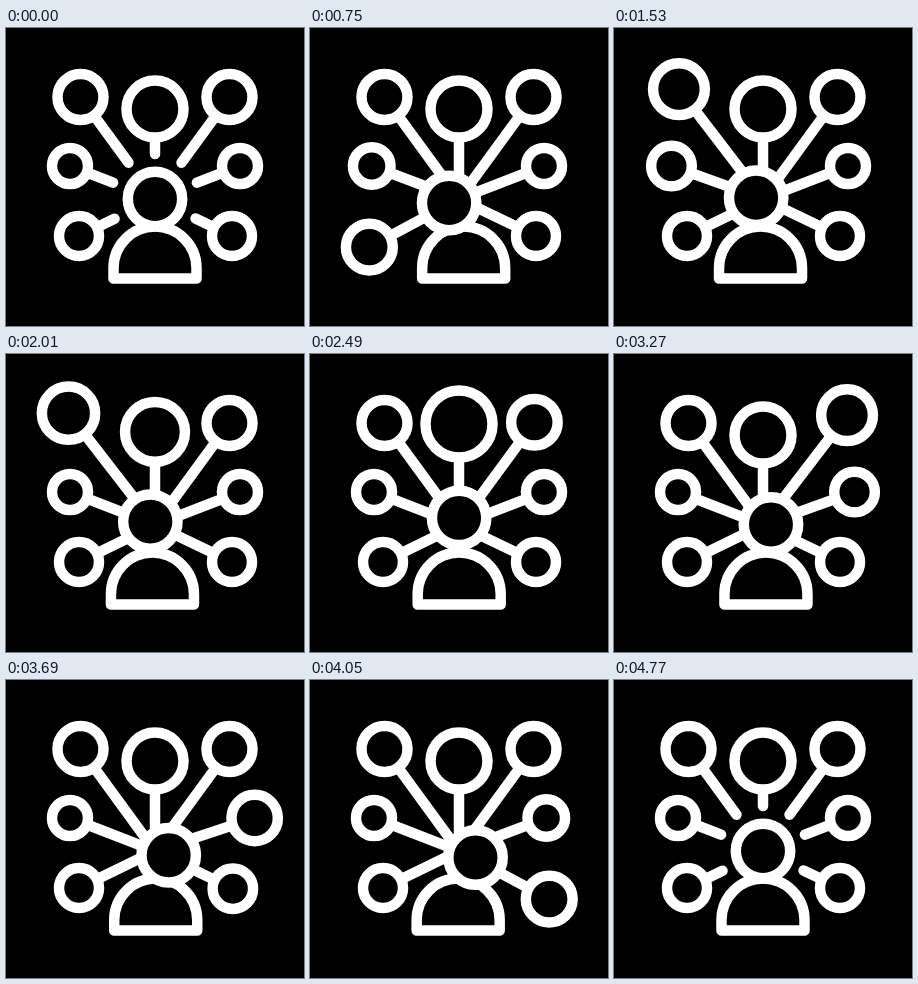
An HTML page that plays this animation: 298 by 298 pixels, repeating every 5.4 s.

```html
<!DOCTYPE html>
<html lang="en">
<head>
<meta charset="utf-8">
<title>Network person</title>
<style>
  html, body { margin: 0; width: 100%; height: 100%; overflow: hidden; background: #000; }
  svg { display: block; width: 100%; height: 100%; }
</style>
</head>
<body>
<svg viewBox="0 0 298 298" fill="#000" stroke="#fff" stroke-width="10.5" stroke-linecap="round" stroke-linejoin="round">
  <g id="links"></g>
  <g id="nodes"></g>
  <path id="body" d="M107.5 250.5V240a41.5 41.5 0 0 1 83 0v10.5z"/>
  <circle id="head" r="27.2"/>
</svg>
<script>
const LOOP = 5400, STEP = 600, END = 4800, FRAME = 30;
const HOME = { x: 149, y: 171 };

// Nodes in order of their pulse: rest place and radius, then change at the peak
const nodes = [
  { x: 73, y: 208, r: 20, dx: -16, dy: 13, dr: 4 },
  { x: 64, y: 138, r: 18, dx: -15.5, dy: 0, dr: 5.5 },
  { x: 74.5, y: 69, r: 23, dx: -16.5, dy: -13.5, dr: 5 },
  { x: 149, y: 81, r: 28.5, dx: 0, dy: -11.6, dr: 5.3 },
  { x: 223.5, y: 69, r: 23, dx: 16.5, dy: -13.5, dr: 5 },
  { x: 234, y: 138, r: 18, dx: 15.5, dy: 0, dr: 5.5 },
  { x: 226, y: 208, r: 20, dx: 15.5, dy: 13, dr: 4 }
];

// Keys: time, then values
const headKeys = [[0, 0, 0], [600, -10, 4.3], [1800, -6.4, -2], [2400, 0, -7.2], [4200, 16.8, 6.8], [4800, 0, 0]];
const bodyKeys = [[0, 0], [600, 5], [1800, -3.5], [2400, 0], [3000, 3.5], [4200, -1], [4800, 0]];
const gapKeys = [[0, 45], [600, 12], [4200, 12], [4800, 45]];

const $ = id => document.getElementById(id);
const ease = p => (1 - Math.cos(Math.PI * p)) / 2;

function add(parent, name) {
  const el = document.createElementNS("http://www.w3.org/2000/svg", name);
  return $(parent).appendChild(el);
}

function set(el, attrs) {
  for (const k in attrs) el.setAttribute(k, attrs[k]);
}

function sample(keys, t) {
  const i = keys.findIndex(k => k[0] > t);
  if (i < 0) return keys[keys.length - 1].slice(1);
  const a = keys[i - 1], b = keys[i];
  const p = ease((t - a[0]) / (b[0] - a[0]));
  return a.slice(1).map((v, j) => v + (b[j + 1] - v) * p);
}

for (const n of nodes) {
  n.line = add("links", "line");
  n.ring = add("nodes", "circle");
}

function draw(time) {
  const t = Math.floor(time % LOOP / FRAME) * FRAME;
  const now = t >= END - FRAME ? END : t;
  const [hx, hy] = sample(headKeys, now);
  const [bx] = sample(bodyKeys, now);
  const [gap] = sample(gapKeys, now);

  // Links point at the head's resting place and stop short of it by the gap
  nodes.forEach((n, i) => {
    const p = ease(Math.max(0, 1 - Math.abs(now - (i + 1) * STEP) / STEP));
    const x = n.x + n.dx * p, y = n.y + n.dy * p;
    const k = gap / Math.hypot(x - HOME.x, y - HOME.y);
    set(n.ring, { cx: x, cy: y, r: n.r + n.dr * p });
    set(n.line, { x1: x, y1: y, x2: HOME.x + (x - HOME.x) * k, y2: HOME.y + (y - HOME.y) * k });
  });
  set($("head"), { cx: HOME.x + hx, cy: HOME.y + hy });
  set($("body"), { transform: `translate(${bx} 0)` });
}

const start = performance.now();
function tick() {
  draw(performance.now() - start);
  requestAnimationFrame(tick);
}
tick();
</script>
</body>
</html>
```
